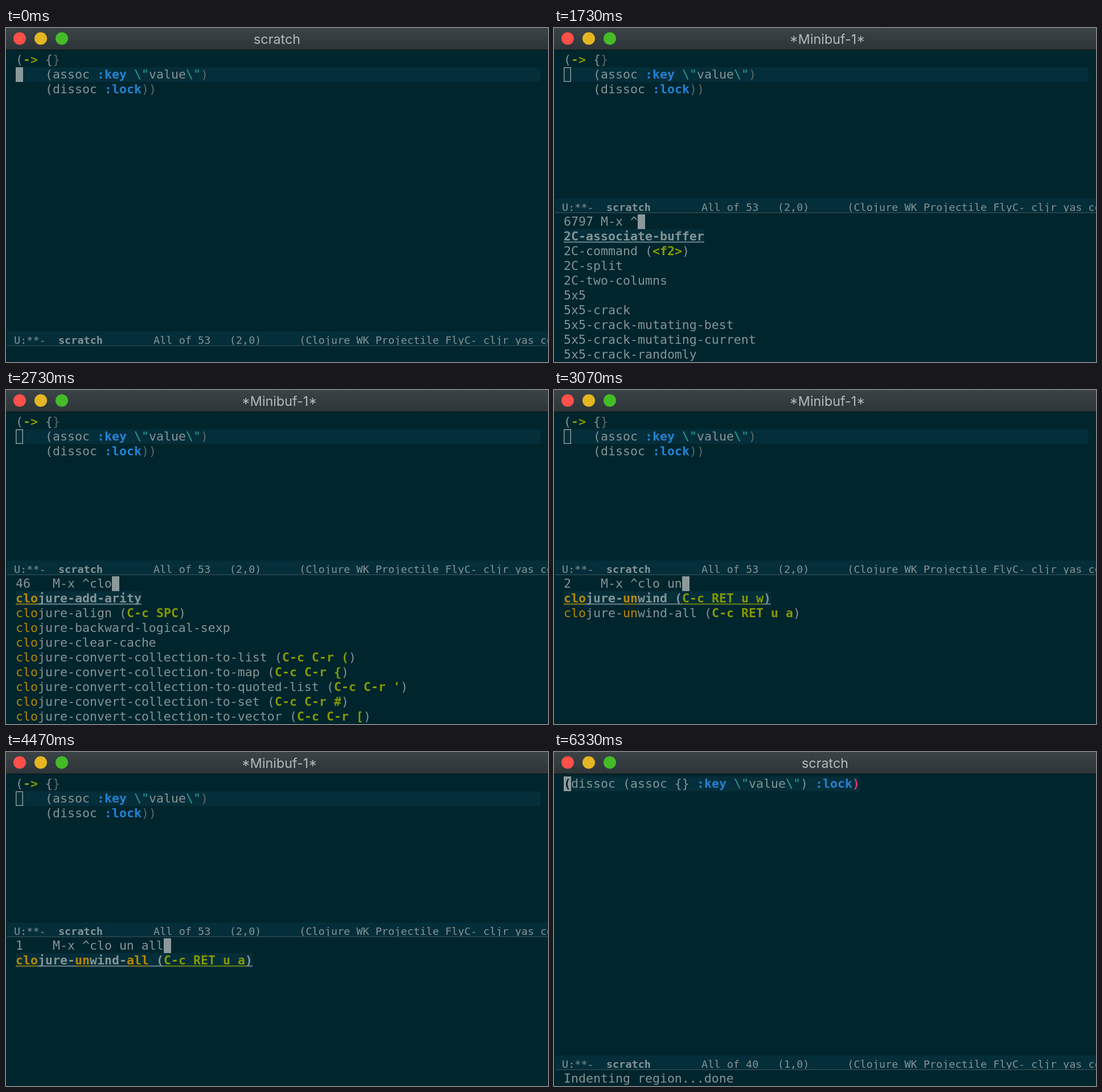
An HTML page with a canvas for the animation above (6.39 s loop, 952 by 588 pixels).

```html
<!DOCTYPE html>
<html lang="en">
<head>
<meta charset="utf-8">
<title>scratch</title>
<style>
html, body { margin: 0; width: 100%; height: 100%; overflow: hidden; background: #00252d; }
canvas { display: block; }
</style>
</head>
<body>
<canvas id="stage" width="952" height="588"></canvas>
<script>
const ctx = document.getElementById("stage").getContext("2d");
const LOOP = 6390, OPEN = 1670, RUN = 4600;
const LEFT = 17, CELL = 13, ROW = 26, MINI = 328;
const MONO = '"DejaVu Sans Mono", monospace';
const C = {
  back: "#00252d", band: "#042e39", text: "#839496", dim: "#5f6765", blue: "#2482d2",
  green: "#859900", cyan: "#2aa198", yellow: "#b58900", pink: "#d33682", cursor: "#8a9a9b"
};

// Moment at which each character of the query appears
const QUERY = "^clo un all";
const KEYS = [OPEN, 2530, 2630, 2700, 2870, 2930, 3000, 3130, 3200, 3270, 3330];

const UNWIND = ["clojure-unwind (C-c RET u w)", "clojure-unwind-all (C-c RET u a)"];
const CLOJURE = [
  "clojure-add-arity", "clojure-align (C-c SPC)", "clojure-backward-logical-sexp",
  "clojure-clear-cache", "clojure-convert-collection-to-list (C-c C-r ()",
  "clojure-convert-collection-to-map (C-c C-r {)",
  "clojure-convert-collection-to-quoted-list (C-c C-r ')",
  "clojure-convert-collection-to-set (C-c C-r #)",
  "clojure-convert-collection-to-vector (C-c C-r [)"
];

// Candidate count and list, by length of the query
function candidates(length) {
  if (length > 8) return [1, UNWIND.slice(1)];
  if (length > 6) return [2, UNWIND];
  if (length > 3) return [46, CLOJURE];
  if (length === 3) return [102, [
    "clean-buffer-list", "clean-mode", "clear-rectangle (C-x r c)", "cljr-add-declaration",
    "cljr-add-keybindings-with-prefix", "cljr-add-missing-libspec",
    "cljr-add-project-dependency", "cljr-add-require-to-ns", "cljr-add-stubs"]];
  if (length === 2) return [611, [
    "c++-mode", "c-add-style", "c-backslash-region", "c-backward-conditional",
    "c-beginning-of-defun", "c-beginning-of-statement", "c-context-line-break",
    "c-context-open-line", "c-electric-backspace"]];
  return [6797, [
    "2C-associate-buffer", "2C-command (<f2>)", "2C-split", "2C-two-columns", "5x5",
    "5x5-crack", "5x5-crack-mutating-best", "5x5-crack-mutating-current",
    "5x5-crack-randomly"]];
}

function rect(x, y, w, h, color) {
  ctx.fillStyle = color;
  ctx.fillRect(x, y, w, h);
}

// Draws [text, colour, bold] runs on the character grid
function runs(parts, top, col = 0, underline = false) {
  for (const [str, color = C.text, bold = false] of parts) {
    const x = LEFT + col * CELL;
    ctx.font = `${bold ? "bold " : ""}21.593px ${MONO}`;
    ctx.fillStyle = color;
    ctx.fillText(str, x, top + 20);
    if (underline) ctx.fillRect(x, top + 22, str.length * CELL, 1.5);
    col += str.length;
  }
}

function titleBar(title, center) {
  const shade = ctx.createLinearGradient(0, 0, 0, 38);
  shade.addColorStop(0, "#3b4347");
  shade.addColorStop(1, "#2d3538");
  rect(0, 0, 952, 38, shade);
  rect(0, 38, 952, 1, "#0b1113");
  ["#ff5049", "#e5b622", "#45bb28"].forEach((color, i) => {
    ctx.fillStyle = color;
    ctx.beginPath();
    ctx.arc(24 + i * 37, 18.5, 11, 0, Math.PI * 2);
    ctx.fill();
  });
  ctx.font = "23.3px Inter, sans-serif";
  ctx.fillStyle = "#b4babc";
  ctx.textAlign = "center";
  ctx.fillText(title, center, 27.5);
  ctx.textAlign = "left";
}

function modeLine(top, size, position) {
  ctx.save();
  ctx.beginPath();
  ctx.rect(2, top, 950, 24);
  ctx.clip();
  rect(2, top, 950, 24, C.band);
  const put = (str, col, weight = "") => {
    ctx.font = `${weight} 18.5px ${MONO}`;
    ctx.fillStyle = C.text;
    ctx.fillText(str, 14 + col * 11.14, top + 22);
  };
  put("U:**-", 0);
  put("scratch", 7, "bold");
  put(`All of ${size}`, 22);
  put(position, 34);
  put("(Clojure WK Projectile FlyC- cljr yas company", 45);
  ctx.restore();
  rect(2, top + 24.5, 950, 1.5, "#2e4d55");
}

function threadedCode(active) {
  rect(LEFT, 69, 922, ROW, C.band);
  if (active) {
    rect(LEFT, 69, CELL, ROW, C.cursor);
  } else {
    ctx.strokeStyle = C.cursor;
    ctx.lineWidth = 1.5;
    ctx.strokeRect(LEFT + 0.75, 69.75, CELL - 1.5, ROW - 1.5);
  }
  runs([["("], ["->", C.green, true], [" {"], ["}", C.dim]], 43);
  runs([["(assoc "], [":key", C.blue, true], [" "], ['\\"', C.cyan], ["value"],
    ['\\"', C.cyan], [")", C.dim]], 69, 4);
  runs([["(dissoc "], [":lock", C.blue, true], ["))", C.dim]], 95, 4);
}

function unwoundCode() {
  rect(LEFT, 43, 40 * CELL, ROW, C.band);
  rect(LEFT, 43, CELL, ROW, C.cursor);
  runs([["(", C.back, true], ["dissoc (assoc {} "], [":key", C.blue, true], [" "],
    ['\\"', C.cyan], ["value"], ['\\"', C.cyan], [") "], [":lock", C.blue, true],
    [")", C.pink, true]], 43);
}

// Splits a candidate into matched, plain and key binding runs
function candidateRuns(line, words, bold) {
  const [, name, key] = line.match(/^(\S+)(?: \((.+)\))?$/);
  const parts = [];
  let from = 0;
  for (const word of words) {
    const at = name.indexOf(word, from);
    if (at < 0) break;
    parts.push([name.slice(from, at), C.text, bold], [word, C.yellow, bold]);
    from = at + word.length;
  }
  parts.push([name.slice(from), C.text, bold]);
  if (key) parts.push([" (", C.text, bold], [key, C.green, true], [")", C.text, bold]);
  return parts;
}

function minibuffer(query) {
  const [count, list] = candidates(query.length);
  const prompt = `${String(count).padEnd(5)}M-x ${query}`;
  runs([[prompt]], MINI);
  rect(LEFT + prompt.length * CELL, MINI, CELL, ROW, C.cursor);
  const words = query.slice(1).split(" ").filter(Boolean);
  rect(LEFT, MINI + ROW, list[0].length * CELL, ROW, C.band);
  list.forEach((line, i) =>
    runs(candidateRuns(line, words, i === 0), MINI + ROW * (i + 1), 0, i === 0));
}

function draw(now) {
  const t = now % LOOP;
  const done = t >= RUN, asking = t >= OPEN && !done;
  rect(0, 0, 952, 588, C.back);
  titleBar(asking ? "*Minibuf-1*" : "scratch", asking ? 480 : 476);
  if (done) {
    unwoundCode();
    modeLine(534, 40, "(1,0)");
    runs([["Indenting region...done"]], 562);
  } else {
    threadedCode(!asking);
    modeLine(asking ? 300 : 534, 53, "(2,0)");
    if (asking) minibuffer(QUERY.slice(0, KEYS.filter(k => k <= t).length));
  }
}

function tick() {
  draw(performance.now());
  requestAnimationFrame(tick);
}
tick();
</script>
</body>
</html>
```
